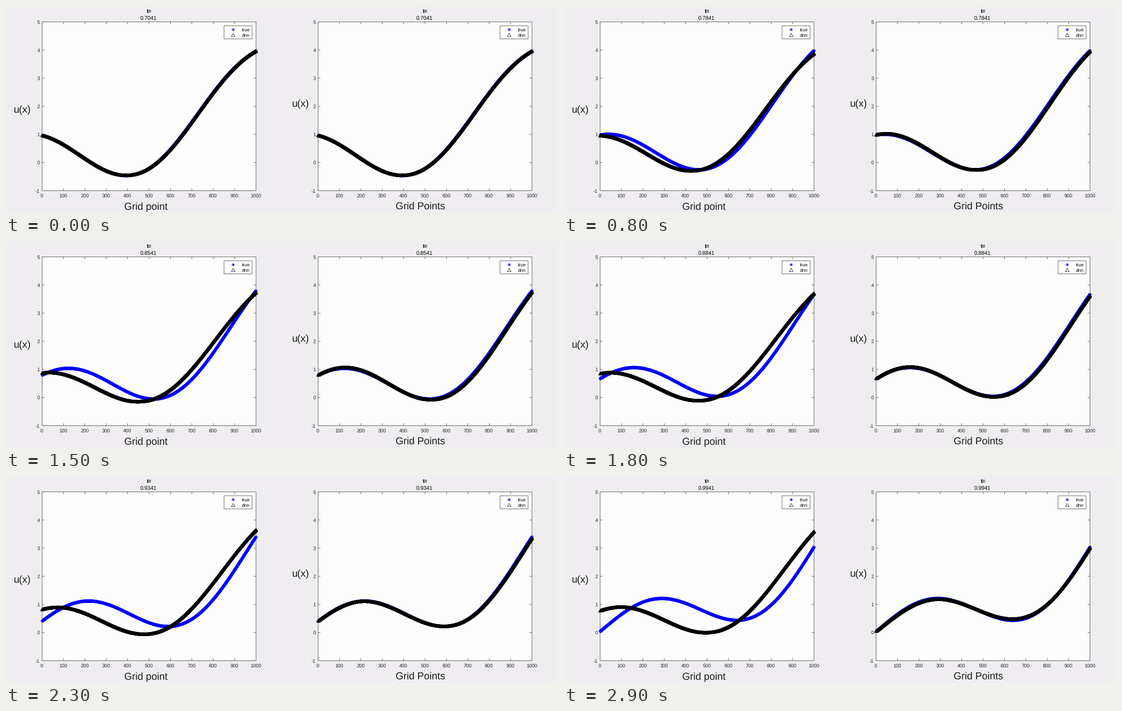
A matplotlib script for the animation above (3 s loop, 1200 by 450 pixels).

```python
import numpy as np
import matplotlib.pyplot as plt
from matplotlib.animation import FuncAnimation
from matplotlib.patches import Rectangle

W, H, DPI = 1200, 450, 100
PX = 72 / DPI  # points per pixel
FRAMES, STEP = 30, 100
LEFT, RIGHT, TOP, BOTTOM = 78.5, 543.5, 34.5, 401.5
INK, FRAME, BLUE = "#262626", "#525252", "#0000ff"

plt.rcParams.update({
    "font.family": "Liberation Sans",
    "text.hinting": "no_hinting",
    "path.simplify": False,
})
fig = plt.figure(figsize=(W / DPI, H / DPI), dpi=DPI, facecolor="#efedf0")
ax = fig.add_axes([0, 0, 1, 1])
ax.set(xlim=(0, W), ylim=(H, 0))
ax.axis("off")

x = np.arange(1, 1001) / 1000

# Marker outlines in pixels; NaN lifts the pen
GAP = [np.nan, np.nan]
ARM, DIAG = 3.7, 2.6
STAR = np.array([[-ARM, 0], [ARM, 0], GAP, [0, -ARM], [0, ARM], GAP,
                 [-DIAG, -DIAG], [DIAG, DIAG], GAP,
                 [-DIAG, DIAG], [DIAG, -DIAG], GAP])
TRIANGLE = np.array([[-4, 2.7], [4, 2.7], [0, -4], [-4, 2.7], GAP])
MARKERS = {"true": (STAR, BLUE), "dnn": (TRIANGLE, "black")}


def smooth(s):
    s = min(max(s, 0), 1)
    return s * s * (3 - 2 * s)


def wave(phase, amp=1, slope=3, offset=0):
    return amp * np.sin(2 * np.pi * (x - phase)) + slope * x**2 + offset


def drifting(t, s):
    """Network that lags behind and loses amplitude."""
    rise = np.sin(np.pi / 2 * s)
    return wave(0.7041 + 0.16 * s - 0.033 * s**2,
                1 - 0.15 * smooth(s / 0.6), 3 - 0.18 * rise, 0.025 * rise)


def tracking(t, s):
    """Network that stays close, with a small swinging error."""
    swing = 0.04 * np.sin(1.4 * np.pi * s) * np.sin(2.2 * np.pi * x)
    sag = 0.06 * np.sin(np.pi * s) * x**2
    return wave(t) + swing - sag


def to_x(v):
    return LEFT + v * (RIGHT - LEFT)


def to_y(u):
    return BOTTOM - (u + 1) / 6 * (BOTTOM - TOP)


def line(xs, ys):
    ax.plot(xs, ys, color=FRAME, lw=PX, zorder=2, snap=False)


def label(px, py, s, size, ha="center", color="black", **kw):
    return ax.text(px, py, s, fontsize=size * PX, ha=ha, va="baseline",
                   color=color, zorder=6, **kw)


def stamp(kind, xs, ys):
    """Outline of one marker at every point, as a single path."""
    shape = MARKERS[kind][0]
    return (np.add.outer(xs, shape[:, 0]).ravel(),
            np.add.outer(ys, shape[:, 1]).ravel())


def markers(kind, xs, ys):
    return ax.plot(*stamp(kind, xs, ys), color=MARKERS[kind][1], lw=0.8 * PX,
                   solid_joinstyle="round", solid_capstyle="butt",
                   zorder=4, snap=False)[0]


def panel(dx, xlabel, xlabel_mid, ylabel_x, ylabel_y, network):
    l, r = LEFT + dx, RIGHT + dx
    ax.add_patch(Rectangle((l, TOP), r - l, BOTTOM - TOP, fc="#fdfdfd", ec="none"))
    line([l, r, r, l, l], [TOP, TOP, BOTTOM, BOTTOM, TOP])
    for k in range(11):
        px = to_x(k / 10) + dx
        line([px, px], [BOTTOM, BOTTOM - 4.5])
        line([px, px], [TOP, TOP + 4.5])
        label(px - 0.5, 416, str(100 * k), 10.8, color=INK)
    for k in range(-1, 6):
        py = to_y(k)
        line([l, l + 4.5], [py, py])
        line([r, r - 4.5], [py, py])
        label(l - 5, py + 4, str(k), 10.8, ha="right", color=INK)

    label(xlabel_mid, 443, xlabel, 21.8, color="#1c1c1c")
    label(ylabel_x, ylabel_y, "u(x)", 21.8, ha="left", color="#1c1c1c")
    label(l + 232.3, 15, "t=", 11.8, weight="bold")
    clock = label(l + 231.5, 30.3, "", 11.8)

    ax.add_patch(Rectangle((dx + 474, 43), 61, 28.5, fc="white", ec=FRAME,
                           lw=PX, zorder=3, snap=False))
    for kind, py in (("true", 51.4), ("dnn", 63.6)):
        markers(kind, [dx + 494], [py])
        label(dx + 513, py + 3.5, kind, 10.3, ha="left")

    xs = to_x(x) + dx
    curves = [markers(kind, xs, to_y(wave(0))) for kind in MARKERS]
    return clock, xs, curves, network


panels = [
    panel(0, "Grid point", 304, 16.3, 232, drifting),
    panel(600, "Grid Points", 901, 621.3, 219, tracking),
]


def draw(i):
    t = 0.7041 + 0.01 * i
    s = i / (FRAMES - 1)
    for clock, xs, (true, dnn), network in panels:
        clock.set_text(f"{t:.4f}")
        true.set_data(*stamp("true", xs, to_y(wave(t))))
        dnn.set_data(*stamp("dnn", xs, to_y(network(t, s))))


anim = FuncAnimation(fig, draw, frames=FRAMES, interval=STEP, repeat=True,
                     repeat_delay=0, init_func=lambda: draw(0))
plt.show()
```
